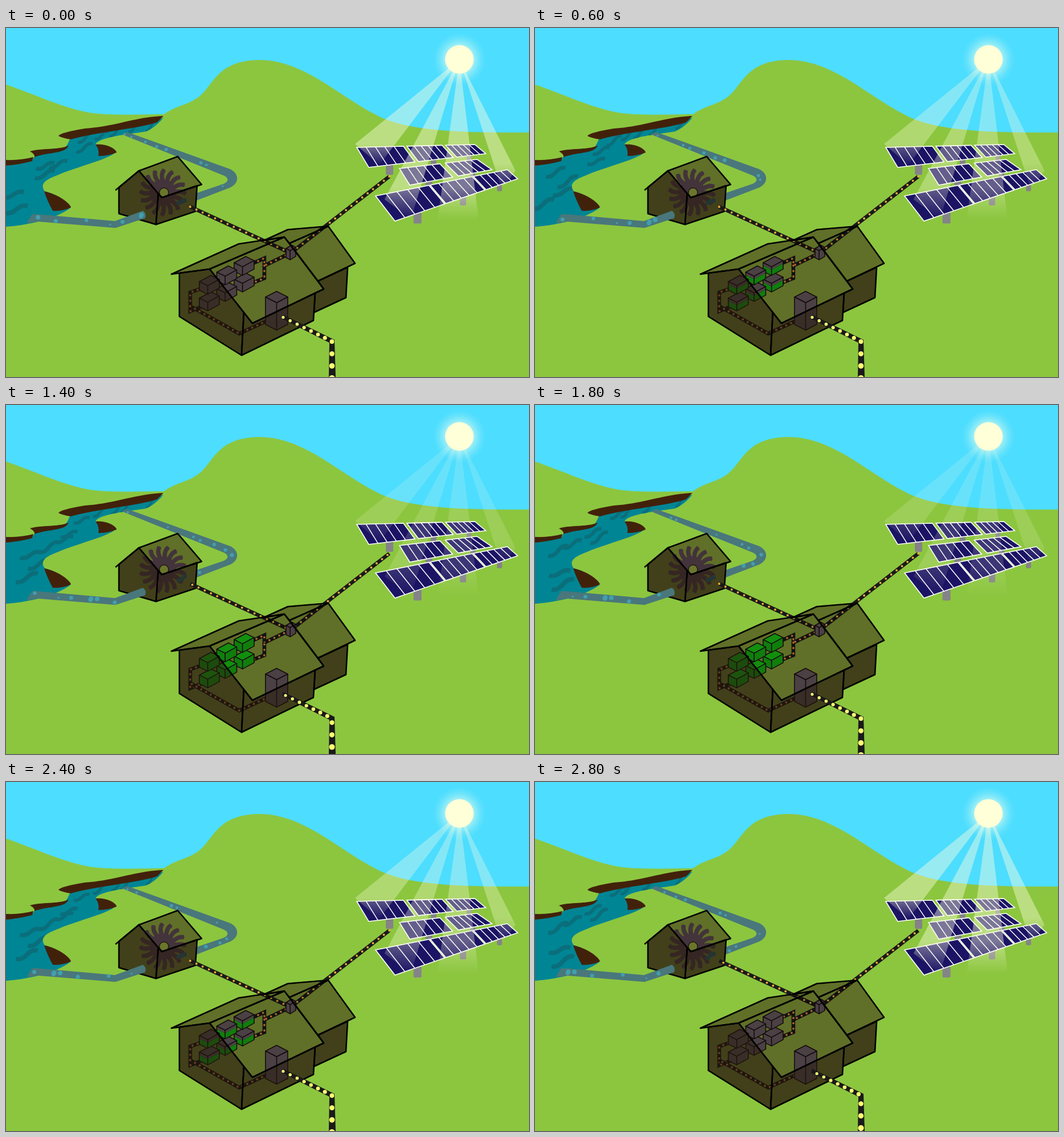
An HTML page for the animation above (3000 ms loop, 917 by 611 pixels).

```html
<!DOCTYPE html>
<html lang="en">
<head>
<meta charset="utf-8">
<title>Off-grid power</title>
<style>
html, body { margin: 0; width: 100%; height: 100%; overflow: hidden; background: #8cc63f; }
svg { display: block; width: 100%; height: 100%; }
</style>
</head>
<body>
<svg viewBox="0 0 917 611">
  <defs>
    <radialGradient id="glow">
      <stop offset=".5" stop-color="#c9f8f0" stop-opacity=".75"/>
      <stop offset="1" stop-color="#7de8fa" stop-opacity="0"/>
    </radialGradient>
    <linearGradient id="beam" x2="0" y2="1">
      <stop offset=".8" stop-color="#ffffe0"/>
      <stop offset="1" stop-color="#ffffe0" stop-opacity="0"/>
    </linearGradient>
    <clipPath id="river">
      <path id="water" d="M276 157C230 172 160 180 113 192C107 207 104 214 85 217C62 219 50 220 47 231Q24 238 0 241V348C40 345 88 334 113 315C100 298 85 290 68 286C60 275 66 268 82 261C125 242 175 232 192 218C180 208 170 203 157 204C162 190 225 185 246 181Q262 174 276 157Z"/>
    </clipPath>
  </defs>
  <rect width="917" height="611" fill="#4dddff"/>
  <circle cx="795" cy="55" r="47" fill="url(#glow)"/>
  <path fill="#8cc63f" d="M0 99C50 116 100 140 145 148C180 154 240 151 277 151C300 134 325 135 345 114C365 95 375 56 445 56C520 56 580 116 645 150C700 182 800 183 917 183V611H0Z"/>
  <use href="#water" fill="#008594"/>
  <g id="ripples" clip-path="url(#river)" fill="none" stroke="#0a6f7b"></g>
  <g fill="#42210b">
    <path d="M276 154C225 156 195 172 138 176C115 180 95 184 92 189Q100 193 114 195C160 182 235 176 265 165Z"/>
    <path d="M110 206C90 214 60 210 42 216Q51 221 50 226C70 218 98 220 107 210Z"/>
    <path d="M0 231Q25 232 48 226L46 233Q24 239 0 241Z"/>
    <path d="M157 204C175 202 193 211 194 218Q180 224 162 224Q164 213 157 204Z"/>
    <path d="M67 286C88 290 110 304 114 314Q100 321 82 320Q72 302 67 286Z"/>
  </g>
  <path fill="#49777b" d="M203 186L212 182L390 246C408 252 411 270 394 279L334 302V289L381 273C391 269 391 262 381 258L210 189Z"/>
  <g id="mill"></g>
  <path fill="#49777b" d="M36 342L45 327Q48 325 55 326L191 338L240 320Q247 324 244 333L192 350L57 339Z"/>
  <g id="bubbles" fill="#40a0b0"></g>
  <g id="solar"></g>
  <g id="rays" fill="url(#beam)"></g>
  <circle cx="795" cy="55" r="25" fill="#ffffd8"/>
  <g id="house"></g>
  <path fill="#1a1a1a" d="M486 502L576 546L578 611H566L567 551L484 509Z"/>
  <g id="output" fill="#ffff73"></g>
</svg>
<script>
const STEP = 200, STEPS = 15;
const METAL = '#6b5d61', LEAF = '#1acd14';
const OUTLINE = 'stroke="#000" stroke-width="2.6" stroke-linejoin="round"';
const $ = id => document.getElementById(id);
const range = n => [...Array(n).keys()];
const draw = (n, shape) => range(n).map(shape).join('');
const poly = (points, attrs = '') => `<polygon points="${points}" ${attrs}/>`;
const circle = (x, y, r, attrs = '') => `<circle cx="${x.toFixed(2)}" cy="${y.toFixed(2)}" r="${r.toFixed(2)}" ${attrs}/>`;
const lerp = (a, b, f) => [a[0] + (b[0] - a[0]) * f, a[1] + (b[1] - a[1]) * f];
const gapOf = (a, b) => Math.hypot(b[0] - a[0], b[1] - a[1]);
const lengthOf = pts => pts.slice(1).reduce((sum, p, i) => sum + gapOf(pts[i], p), 0);

function randomFrom(seed) {
  return () => (seed = seed * 16807 % 2147483647) / 2147483647;
}

// Point at a distance along a polyline, or null past its end.
function along(pts, dist) {
  for (let i = 1; i < pts.length; i++) {
    const len = gapOf(pts[i - 1], pts[i]);
    if (dist <= len) return lerp(pts[i - 1], pts[i], dist / len);
    dist -= len;
  }
  return null;
}

function wire(pts, step, gap, color) {
  let out = `<polyline points="${pts.join(' ')}" fill="none" stroke="#1a1a1a" stroke-width="6.5"/>`;
  for (let d = gap * (step % 3) / 3, p; (p = along(pts, d)); d += gap) out += circle(...p, 1.9, `fill="${color}"`);
  return out;
}

// Box seen from above; a skew below .5 turns it to the right.
function box(x, y, w, rise, h, skew, level = 0) {
  const line = 'stroke="#1c0f12" stroke-width="1.6" stroke-linejoin="round"';
  const cx = x + w * skew, right = x + w, lift = rise * (.5 - skew) * 4.4;
  const ry = y - lift, cy = y + rise - lift;
  const side = drop => `${x},${y + drop} ${cx},${cy + drop} ${right},${ry + drop} ${right},${ry + h} ${cx},${cy + h} ${x},${y + h}`;
  const bars = draw(Math.ceil(level * 5), k => {
    const drop = h * (1 - k / 5);
    return `<path d="M${x} ${y + drop}L${cx} ${cy + drop}L${right} ${ry + drop}" fill="none" stroke="#10700e" stroke-width=".8"/>`;
  });
  return poly(`${x},${y} ${x + w * (1 - skew)},${y - rise} ${right},${ry} ${cx},${cy}`, `fill="${level >= 1 ? LEAF : METAL}" ${line}`)
    + poly(side(0), `fill="${METAL}"`)
    + (level ? poly(side(h * (1 - level)), `fill="${LEAF}"`) + bars : '')
    + poly(side(0), `fill="none" ${line}`) + `<path d="M${cx} ${cy}v${h}" ${line}/>`;
}

// See-through building: far sides, contents, then shaded near sides.
function building(roofs, walls, contents) {
  const layer = (sides, attrs) => sides.map(s => poly(s, attrs)).join('');
  return layer(roofs, 'fill="#89a039"') + layer(walls, 'fill="#81923a"') + contents
    + layer(walls, `fill="#20140a" fill-opacity=".65" ${OUTLINE}`)
    + layer(roofs, `fill="#000" fill-opacity=".3" ${OUTLINE}`);
}

function mill(step) {
  const blades = draw(16, i => `<path d="M-4 -19Q-8 -33 -1 -42Q5 -41 5 -37Q0 -32 4 -19Z" transform="rotate(${i * 22.5})"/>`);
  const wheel = `<g transform="translate(275 288) rotate(${step * 24})" fill="#604953">${blades}<circle r="23"/></g>`;
  const jet = draw(3, i => circle(303 + i * 5, 306 - i * 3 + (step + i) % 3, 4, 'fill="#2f7480"'));
  return building(
    ['233,250 301,225 343,274 273,297'],
    ['198,279 233,250 267,290 263,344 198,325', '267,290 273,297 335,276 332,321 263,344'],
    wheel + jet + circle(277, 288, 8, 'fill="#98aa3d" stroke="#33231f" stroke-width="1.5"')
  ) + `<path d="M192 284L233 250" ${OUTLINE}/>`;
}

const hub = [499, 394], bus = [453, 416], corner = [323, 487];
const feeds = [[[323, 313], hub], [[672, 260], hub]];
const innerWires = [
  [hub, bus, [453, 403], [433, 412]],
  [bus, [453, 438], [433, 446]],
  [[345, 455], [323, 463], corner],
  [[350, 485], [323, 496], corner],
  [corner, [409, 535], [474, 505]]
];

function house(step, level) {
  const peak = [488, 366], front = [357, 422], eave = [557, 457], low = [432, 517];
  const wingPeak = [565, 347], join = [497, 377], valley = [547, 443];
  const sill = [417, 498], foot = [413, 573], wallTop = [542, 464];
  const roofs = [
    [[452, 372], [494, 353], wingPeak, join, peak],
    [join, wingPeak, [612, 412], valley],
    [[290, 431], [408, 378], peak, front],
    [front, peak, eave, low]
  ];
  const walls = [
    [valley, [599, 419], [596, 472], [540, 498], wallTop, eave],
    [[304, 429], front, sill, foot, [304, 505]],
    [sill, low, wallTop, [539, 512], foot]
  ];
  const cell = (i, y) => box(400 - 30.5 * i, y + 16.5 * i, 35, 11, 15, .42, level);
  return building(roofs, walls,
    feeds.map(pts => wire(pts, step, 12, '#fbb03b')).join('')
    + innerWires.map(pts => wire(pts, step, 9.5, '#f58f3a')).join('')
    + draw(3, i => cell(i, 440)) + draw(3, i => cell(i, 411))
    + box(491, 386, 17, 6, 16, .42) + box(455, 471, 39, 10, 48, .5));
}

// Each row is a quad split into panels that shrink to the right.
function solarRow([a, b, c, d], count, gap) {
  const shares = range(count).map(k => .8 ** k), total = shares.reduce((s, v) => s + v);
  let end = 0, posts = '', panels = '';
  for (const share of shares) {
    const from = end ? end + gap / 2 : 0;
    end += share / total;
    const to = end > .999 ? 1 : end - gap / 2;
    const top = f => lerp(a, b, from + (to - from) * f), base = f => lerp(d, c, from + (to - from) * f);
    const [x, y] = base(.5), w = base(1)[0] - base(0)[0];
    posts += `<rect x="${x - 4 - w * .08}" y="${y}" width="${w * .16}" height="${w * .22}" rx="2" fill="#858388"/>`;
    panels += poly([top(0), top(1), base(1), base(0)], 'fill="#1b1464" stroke="#fff" stroke-width="1.6"')
      + draw(4, k => `<path d="M${top((k + 1) / 5)}L${base((k + 1) / 5)}" stroke="#fff" stroke-width="1.5"/>`);
  }
  return posts + panels;
}
const solar = () => solarRow([[615, 209], [822, 204], [841, 220], [636, 244]], 3, .03)
  + solarRow([[690, 246], [826, 230], [852, 248], [708, 275]], 2, .07)
  + solarRow([[648, 294], [879, 248], [897, 264], [682, 338]], 3, .01);

// Slope and end height of the left and right edge of each ray.
const rays = () => [
  [-1.236, 203, -.76, 240], [-.536, 300, -.304, 335], [-.136, 335, .12, 335], [.328, 282, .504, 250]
].map(([left, y1, right, y2]) => poly([[795, 55], [795 + left * (y1 - 55), y1], [795 + right * (y2 - 55), y2]])).join('');

// Seeded bubbles drift down each pipe and wrap within the loop.
const pipes = [
  { pts: [[208, 186], [384, 252], [397, 263], [387, 275], [335, 295]], narrow: .5 },
  { pts: [[240, 327], [192, 343], [48, 332]], narrow: 3 }
];
function bubbles(step) {
  const random = randomFrom(11);
  return pipes.map(({ pts, narrow }) => draw(8, () => {
    const f = (random() + step / STEPS) % 1, side = random() * 2 - 1, size = 1.6 + random() * 2.6;
    const [x, y] = along(pts, f * lengthOf(pts) * .999), room = narrow + (3.5 - narrow) * f;
    return circle(x, y + side * room, Math.min(size, room + 1.5));
  })).join('');
}

// Five sets of swells along the river, wider toward the viewer.
const stream = [[255, 170], [140, 192], [110, 225], [40, 262], [25, 325]];
function ripples(step) {
  const random = randomFrom(70 + step % 5 * 31);
  return draw(11, i => {
    const f = (i + random()) / 11, w = 9 + 11 * f;
    const [x, y] = along(stream, f * lengthOf(stream));
    const left = x - w + (random() - .5) * 60 * f, bend = 4 + 5 * random();
    return `<path d="M${left} ${y + bend}q${w / 2} 3 ${w} ${-bend}t${w} ${-bend}" stroke-width="${4 + 4 * f}"/>`;
  });
}

const output = phase =>
  draw(7, k => circle(486 + 12.2 * (k + phase), 506.5 + 6 * (k + phase), 2.5 + (k + phase) * .17))
  + draw(4, k => circle(571.5, 549 + 21.3 * (k + phase), 3.9 + (k + phase) * .45));

let shown = -1;
function show(step) {
  const level = Math.max(0, Math.min(5, step - 1, 14 - step));
  $('mill').innerHTML = mill(step);
  $('house').innerHTML = house(step, level && .4 + .12 * level);
  $('bubbles').innerHTML = bubbles(step);
  $('ripples').innerHTML = ripples(step);
  $('output').innerHTML = output(step % 3 / 3);
  $('rays').setAttribute('opacity', .42 - .054 * level);
}

function tick() {
  const step = Math.floor(performance.now() / STEP) % STEPS;
  if (step !== shown) show(shown = step);
  requestAnimationFrame(tick);
}
$('solar').innerHTML = solar();
$('rays').innerHTML = rays();
tick();
</script>
</body>
</html>
```
